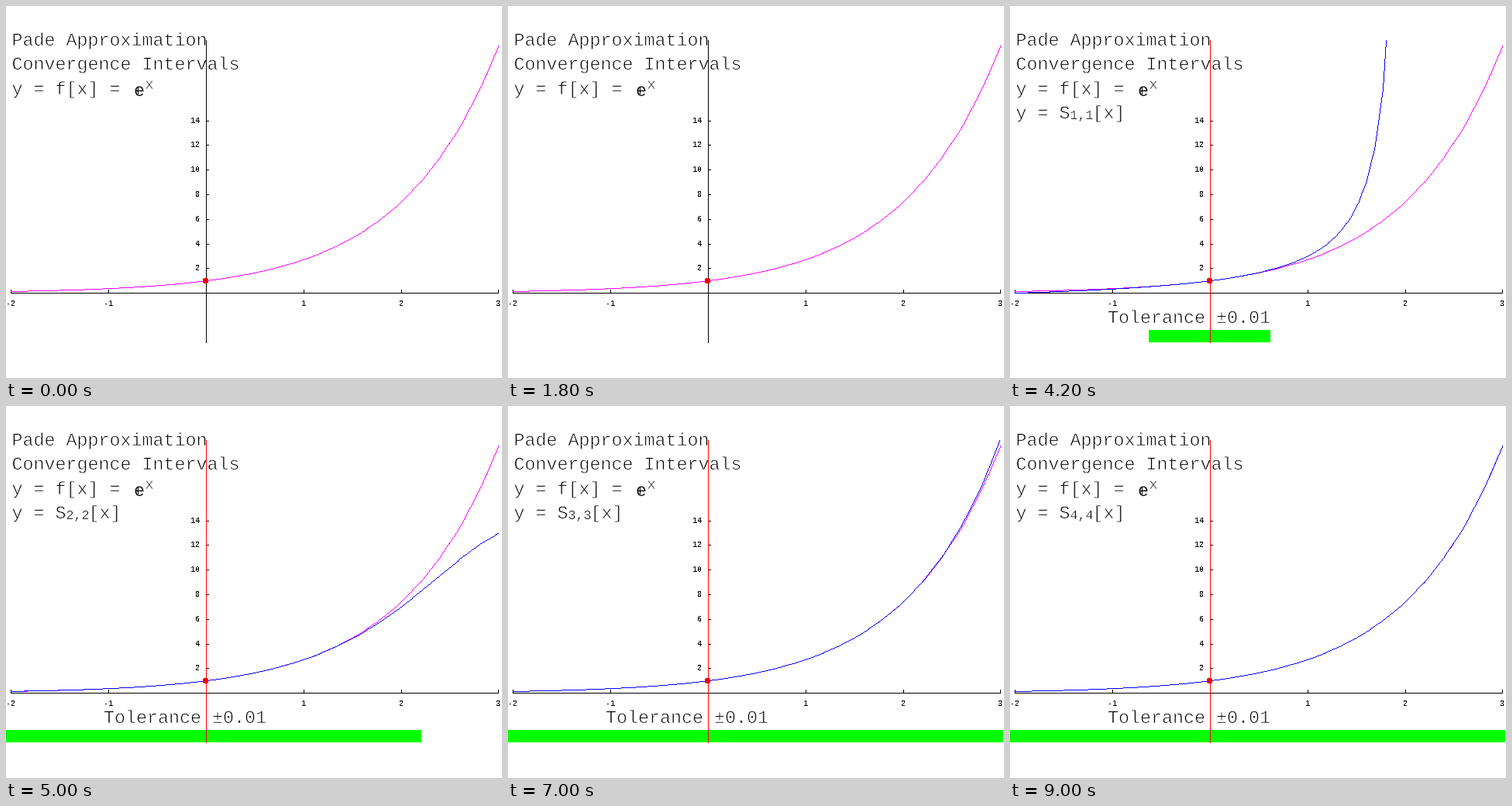
These frames come from a looping animation (640x480 px, 10 s). A matplotlib script:

```python
from math import factorial

import matplotlib.pyplot as plt
import numpy as np
from matplotlib.animation import FuncAnimation
from matplotlib.collections import PolyCollection
from matplotlib.patches import Circle, Rectangle
from matplotlib.patheffects import Stroke

W, H, DPI = 640, 480, 80
PT = 72 / DPI  # points per pixel
CELL = 14      # advance of one large character
BASE, TOP = 370, 44

fig = plt.figure(figsize=(W / DPI, H / DPI), dpi=DPI, facecolor="white")
ax = fig.add_axes([0, 0, 1, 1])
ax.set(xlim=(0, W), ylim=(H, 0))
ax.axis("off")


def px(x):
    return 258.5 + 125.8 * x


def py(y):
    return BASE + 0.54 - 15.88 * y


def box(x0, y0, x1, y1, color="black", z=3):
    return ax.add_patch(Rectangle((x0, y0), x1 - x0, y1 - y0, fc=color,
                                  lw=0, aa=False, zorder=z))


def text(x, y, s, advance=CELL, thin=0.75):
    """Monospaced text from its baseline start; a white rim thins the strokes."""
    t = ax.text(x, y, s, family="Liberation Mono", size=advance / 0.6 * PT,
                va="baseline", zorder=1)
    t.set_path_effects([Stroke(linewidth=thin * PT, foreground="white")])
    return t


def label(x, y, s):
    ax.text(x, y, s, family="Liberation Mono", size=10 * PT,
            va="baseline", antialiased=False, zorder=1)


def curve(color, z):
    return ax.add_collection(PolyCollection([], fc=color, lw=0, aa=False,
                                            zorder=z), autolim=False)


def trace(line, x, y):
    """Fill the pixels along a polyline, one pixel wide."""
    x, y = px(x), py(y)
    steps = np.ceil(np.maximum(abs(np.diff(x)), abs(np.diff(y))))
    ends = np.r_[0, np.cumsum(steps)]
    at = np.arange(ends[-1] + 1)
    dots = np.floor(np.c_[np.interp(at, ends, x), np.interp(at, ends, y)])
    dots = dots[dots[:, 1] >= TOP]
    corners = np.array([(0, 0), (1, 0), (1, 1), (0, 1)])
    line.set_verts(dots[:, None] + corners)


def pade(x, n):
    """Diagonal [n/n] approximant of exp."""
    c = [factorial(2 * n - k) * factorial(n)
         / (factorial(2 * n) * factorial(k) * factorial(n - k))
         for k in range(n, -1, -1)]
    return np.polyval(c, x) / np.polyval(c, -x)


def samples(n):
    if n == 1:  # finer steps towards the pole at x = 2
        return np.r_[xs[xs < 0.8], np.arange(0.856, 1.95, 0.0833)]
    return xs


inner = (612 - 26.55 * np.arange(22, -1, -1) - 258) / 125.8
xs = np.r_[-2, inner, 3]

# axes, ticks and labels
box(6, BASE, 636, BASE + 1)
box(258, TOP, 259, 435)
for v in range(-2, 4):
    x = int(px(v))
    box(x, BASE - 4, x + 1, BASE)
    if v:
        label(x - 3 * len(str(v)), 387, str(v))
for v in range(2, 15, 2):
    y = int(py(v))
    box(259, y, 262, y + 1)
    label(250 - 6 * len(str(v)), y + 3, str(v))

# headings
text(7.5, 51, "Pade Approximation")
text(7.5, 82, "Convergence Intervals")
text(7.5, 114, "y = f[x] =")
text(165, 116, "e", thin=0.3)
box(170, 104, 171, 114)
text(179, 107, "x", 12)

exact = curve("magenta", 4)
trace(exact, xs, np.exp(xs))
approx = curve("blue", 5)
ax.add_patch(Circle((257.5, 354.5), 3.2, fc="#f00000", lw=0, aa=False, zorder=7))

subscript = text(77.5, 146, "", 10, 0.4)
bar = box(0, 418, 0, 434, "lime", 2)
extras = [
    approx, subscript, bar,
    text(7.5, 145, "y = S"),
    text(106.5, 145, "[x]"),
    text(126, 409, "Tolerance ±0.01"),
    box(258, TOP, 259, 435, "red", 6),
]
spans = {1: (179, 336), 2: (0, 536), 3: (0, 639), 4: (0, 639)}


def update(second):
    n = 0 if second < 3 else (second - 1) // 2
    for artist in extras:
        artist.set_visible(n > 0)
    if n:
        x = samples(n)
        trace(approx, x, pade(x, n))
        subscript.set_text(f"{n},{n}")
        left, right = spans[n]
        bar.set_x(left)
        bar.set_width(right - left)
    return extras


anim = FuncAnimation(fig, update, frames=10, interval=1000,
                     repeat=True, repeat_delay=0, blit=False)
plt.show()
```
